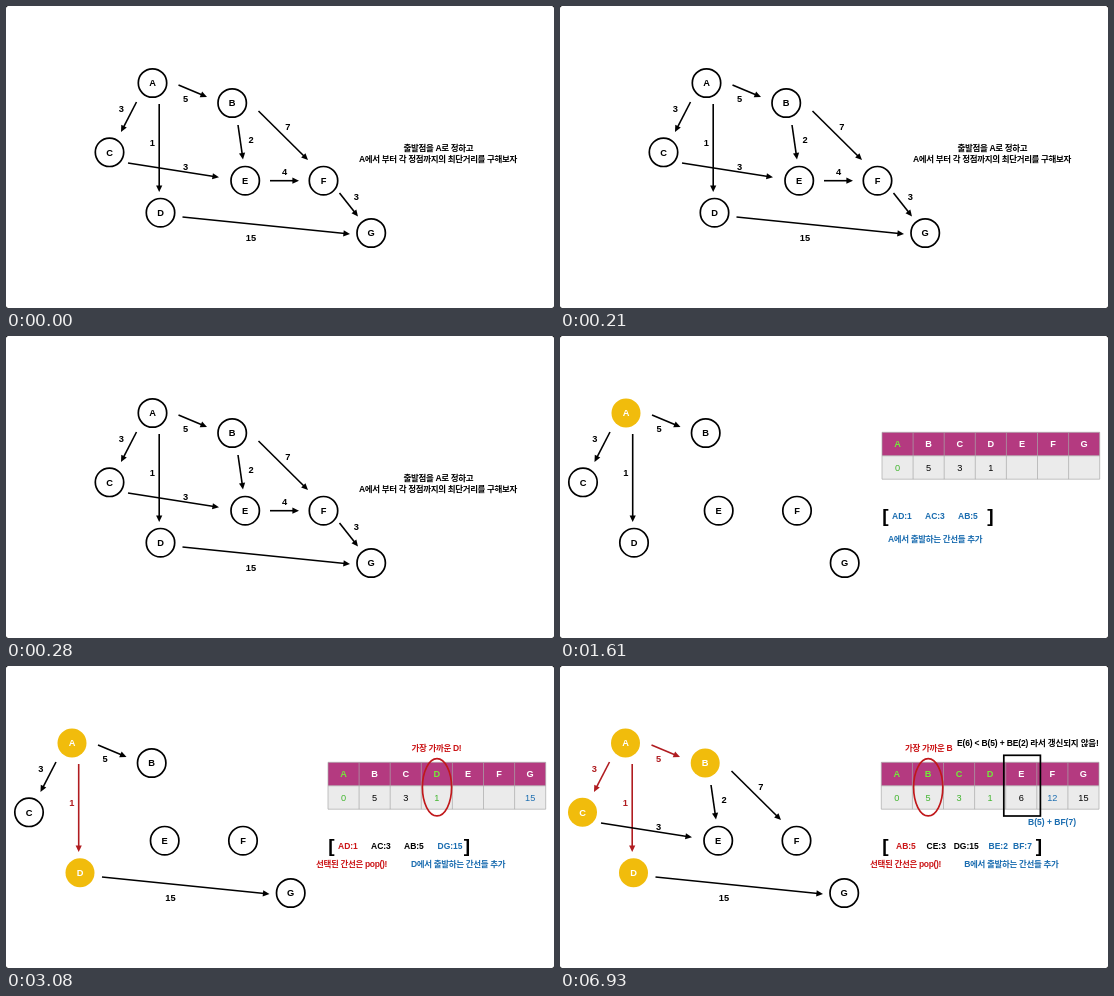
An HTML page that plays this animation: 548 px wide and 302 px high, repeating every 8000 ms.

```html
<!DOCTYPE html>
<html lang="ko">
<head>
<meta charset="utf-8">
<title>Shortest path</title>
<style>
  html, body { margin: 0; width: 100%; height: 100%; overflow: hidden; background: #000; }
  svg { display: block; width: 100%; height: 100%; background: #fff; border-radius: 2.5px; }
  text { font: bold 8.5px "Liberation Sans", "Noto Sans CJK KR", "Noto Sans CJK", sans-serif; }
</style>
</head>
<body>
<svg id="stage" viewBox="0 0 548 302"></svg>
<script>
const DURATION = 8000;
const BLACK = '#000', WHITE = '#fff', GOLD = '#f1bc0c', RED = '#cb1517', EDGE_RED = '#b01c20',
      BLUE = '#1b6db0', GREEN = '#3fb52c', LIME = '#74e83a', MAGENTA = '#b43a80';

const NODES = { A: [146.5, 77], B: [226.2, 97], C: [103.5, 146.3], D: [154.5, 206.7],
                E: [239.2, 174.7], F: [317.5, 174.7], G: [365.2, 227] };

// x1, y1, x2, y2, weight, label x, label y
const EDGES = {
  AB: [172.5, 79, 201, 91, 5, 179.5, 93],
  AC: [130.5, 96, 115, 126, 3, 115.3, 102.7],
  AD: [153.2, 98, 153.2, 186, 1, 146.3, 136.7],
  BE: [232, 119, 237, 153.5, 2, 245, 133.7],
  BF: [252.5, 105, 302, 154, 7, 281.8, 121],
  CE: [122, 157, 213, 171.3, 3, 179.5, 161],
  EF: [264, 174.7, 293, 174.7, 4, 278.5, 165.3],
  DG: [176.5, 211, 344, 228, 15, 245, 232],
  FG: [333.5, 187, 352, 210.5, 3, 350.3, 190.3]
};

const stage = document.getElementById('stage');

function add(parent, tag, attrs = {}) {
  const el = document.createElementNS('http://www.w3.org/2000/svg', tag);
  for (const key in attrs) el.setAttribute(key, attrs[key]);
  parent.append(el);
  return el;
}

// y is the vertical centre of the capitals
function label(g, str, x, y, { fill = BLACK, size = 8.5, anchor = 'middle', weight = 'bold', spacing = 0 } = {}) {
  const el = add(g, 'text', { x, y: y + size * 0.36, fill, 'text-anchor': anchor });
  el.style.fontSize = size + 'px';
  el.style.fontWeight = weight;
  el.style.letterSpacing = spacing + 'px';
  el.textContent = str;
}

const korean = (g, str, x, y, fill, spacing = -0.34) =>
  label(g, str, x, y, { fill, spacing, anchor: 'start' });

function edge(g, name, color) {
  const [x1, y1, x2, y2, weight, lx, ly] = EDGES[name];
  const len = Math.hypot(x2 - x1, y2 - y1);
  const angle = Math.atan2(y2 - y1, x2 - x1) * 180 / Math.PI;
  const arrow = add(g, 'g', { transform: `translate(${x1} ${y1}) rotate(${angle})` });
  add(arrow, 'path', { d: `M0 0H${len - 5}`, stroke: color, 'stroke-width': 1.6 });
  add(arrow, 'path', { d: `M${len} 0l-6.6 -3.1v6.2z`, fill: color });
  label(g, weight, lx, ly, { fill: color, size: 9.3 });
}

function node(g, name, done) {
  const [cx, cy] = NODES[name];
  add(g, 'circle', done ? { cx, cy, r: 14.5, fill: GOLD }
                        : { cx, cy, r: 14.2, fill: WHITE, stroke: BLACK, 'stroke-width': 1.7 });
  label(g, name, cx, cy, { fill: done ? WHITE : BLACK, size: 9.3 });
}

function graph(scene, { dx = 0, edges, chosen = '', done = '' }) {
  const g = add(scene, 'g', { transform: `translate(${dx} 0)` });
  for (const name of edges.split(' ')) edge(g, name, chosen.includes(name) ? EDGE_RED : BLACK);
  for (const name in NODES) node(g, name, done.includes(name));
}

function table(g, left, values, done, fresh = '') {
  const w = 31.1, top = 96.3, mid = 119.8, bottom = 143.2, right = left + 7 * w;
  add(g, 'rect', { x: left, y: top, width: 7 * w, height: mid - top, fill: MAGENTA });
  add(g, 'rect', { x: left, y: mid, width: 7 * w, height: bottom - mid, fill: '#ebebeb' });
  let lines = `M${left} ${top}H${right}M${left} ${mid}H${right}M${left} ${bottom}H${right}`;
  for (let i = 0; i <= 7; i++) lines += `M${left + i * w} ${top}V${bottom}`;
  add(g, 'path', { d: lines, stroke: '#a9a9a9', 'stroke-width': 0.7, fill: 'none' });
  [...'ABCDEFG'].forEach((name, i) => {
    const x = left + (i + 0.5) * w, isDone = done.includes(name);
    label(g, name, x, 108, { fill: isDone ? LIME : WHITE, size: 9.2 });
    const fill = isDone ? GREEN : fresh.includes(name) ? BLUE : BLACK;
    label(g, values[i], x, 131.8, { fill, size: 9.2, weight: 'normal' });
  });
}

// items: [text, x, colour]
function queue(g, end, items) {
  const bracket = { size: 19 };
  label(g, '[', 325.3, 178.8, bracket);
  label(g, ']', end, 178.8, bracket);
  for (const [str, x, fill] of items) label(g, str, x, 180.3, { fill, anchor: 'start' });
}

function nearest(g, name, textX, cx) {
  korean(g, '가장 가까운 ' + name, textX, 82.3, RED);
  add(g, 'ellipse', { cx, cy: 121.3, rx: 14.6, ry: 28.6, fill: 'none', stroke: '#c0181b', 'stroke-width': 1.7 });
}

function captions(g, name, x) {
  korean(g, '선택된 간선은 pop()!', 310, 198, RED);
  korean(g, name + '에서 출발하는 간선들 추가', x, 198, BLUE);
}

const SCENES = [
  [0, g => {
    graph(g, { edges: Object.keys(EDGES).join(' ') });
    korean(g, '출발점을 A로 정하고', 397.5, 141.5, BLACK);
    korean(g, 'A에서 부터 각 정점까지의 최단거리를 구해보자', 353, 152.5, BLACK);
  }],
  [1610, g => {
    graph(g, { dx: -80.5, edges: 'AB AC AD', done: 'A' });
    table(g, 322, [0, 5, 3, 1, '', '', ''], 'A');
    queue(g, 430.5, [['AD:1', 332, BLUE], ['AC:3', 365, BLUE], ['AB:5', 398, BLUE]]);
    korean(g, 'A에서 출발하는 간선들 추가', 328, 203, BLUE);
  }],
  [3080, g => {
    graph(g, { dx: -80.5, edges: 'AB AC AD DG', chosen: 'AD', done: 'AD' });
    table(g, 322, [0, 5, 3, 1, '', '', 15], 'AD', 'G');
    nearest(g, 'D!', 405.5, 431);
    queue(g, 461, [['AD:1', 332, RED], ['AC:3', 365, BLACK], ['AB:5', 398, BLACK], ['DG:15', 431.5, BLUE]]);
    captions(g, 'D', 405);
  }],
  [5110, g => {
    graph(g, { dx: -81, edges: 'AB AC AD CE DG', chosen: 'AC AD', done: 'ACD' });
    table(g, 321.3, [0, 5, 3, 1, '3+3', '', 15], 'ACD', 'E');
    nearest(g, 'C', 375, 399.3);
    label(g, 'C(3) + CE(3)', 460.7, 155.8, { fill: BLUE });
    queue(g, 460.3, [['AC:3', 336, RED], ['AB:5', 366.5, BLACK], ['DG:15', 394, BLACK], ['CE:3', 428.5, BLUE]]);
    captions(g, 'C', 404.3);
  }],
  [6930, g => {
    graph(g, { dx: -81, edges: 'AB AC AD BE BF CE DG', chosen: 'AB AC AD', done: 'ABCD' });
    table(g, 321.3, [0, 5, 3, 1, 6, 12, 15], 'ABCD', 'F');
    nearest(g, 'B', 345, 368.2);
    korean(g, 'E(6) < B(5) + BE(2) 라서 갱신되지 않음!', 397, 76.5, BLACK, -0.16);
    add(g, 'rect', { x: 443.8, y: 89.3, width: 36.6, height: 60.7, fill: 'none', stroke: BLACK, 'stroke-width': 1.7 });
    label(g, 'B(5) + BF(7)', 492, 155.8, { fill: BLUE });
    queue(g, 479, [['AB:5', 336, RED], ['CE:3', 366.5, BLACK], ['DG:15', 393.7, BLACK],
                   ['BE:2', 428.5, BLUE], ['BF:7', 453, BLUE]]);
    captions(g, 'B', 404.3);
  }]
];

// Each scene is shown from its start until the next one begins.
SCENES.forEach(([start, draw], i) => {
  const isFirst = i === 0, isLast = i === SCENES.length - 1;
  const g = add(stage, 'g');
  draw(g);
  const key = (visible, time) => ({ opacity: visible ? 1 : 0, offset: time / DURATION, easing: 'step-end' });
  const keys = [key(isFirst, 0)];
  if (!isFirst) keys.push(key(true, start));
  if (!isLast) keys.push(key(false, SCENES[i + 1][0]));
  keys.push(key(isLast, DURATION));
  g.animate(keys, { duration: DURATION, iterations: Infinity });
});
</script>
</body>
</html>
```
